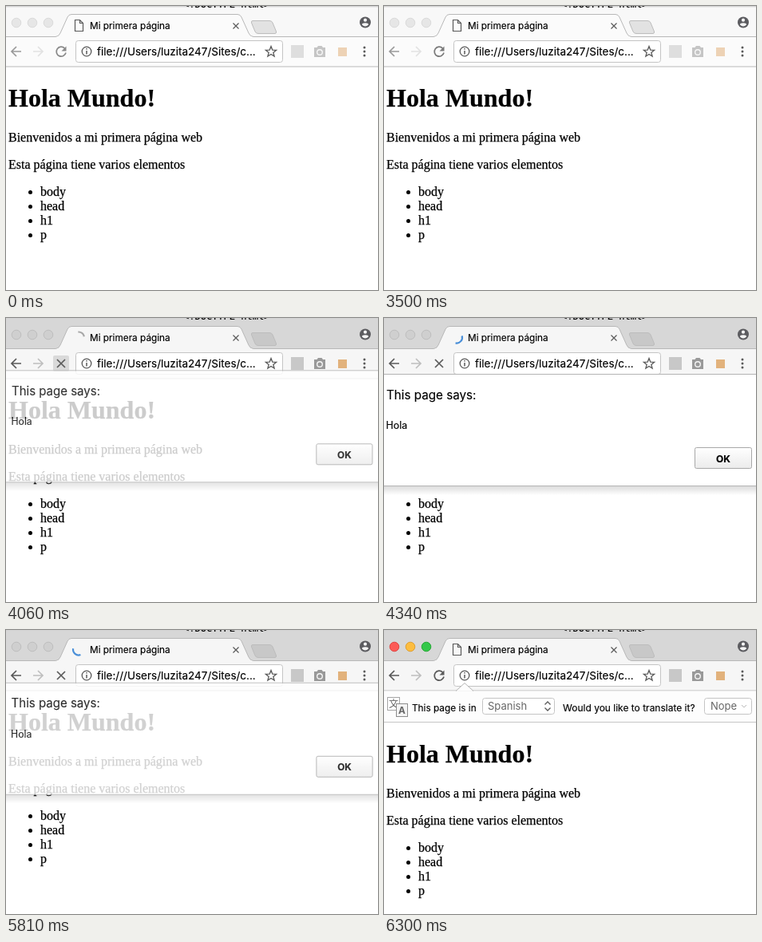
Write an HTML page that moves like this. It is 466 px wide and 356 px high and loops after 8 s.

```html
<!DOCTYPE html>
<html lang="es">
<head>
<meta charset="utf-8">
<style>
  html, body { margin: 0; width: 100%; height: 100%; overflow: hidden; background: #fff; }
  svg { display: block; width: 466px; height: 356px; }
  text { font-family: Inter, sans-serif; font-size: 11.8px; white-space: pre; stroke: #000; stroke-width: .15px; }
  #page text { font-family: "Liberation Serif", serif; font-size: 16px; stroke-width: .25px; }
  #page .h1 { font-size: 32px; font-weight: bold; }
  .soft { fill: #666; stroke: none; }
  .line { fill: none; stroke: #5a5a5a; stroke-width: 1.7; }
  .box { fill: #fff; stroke: #c4c4c4; }
</style>
</head>
<body>
<svg viewBox="0 0 466 356">
  <defs>
    <linearGradient id="shade" x2="0" y2="1">
      <stop stop-opacity=".15"/><stop offset="1" stop-opacity="0"/>
    </linearGradient>
    <linearGradient id="key" x2="0" y2="1">
      <stop stop-color="#fff"/><stop offset="1" stop-color="#ebebeb"/>
    </linearGradient>
    <clipPath id="top"><rect width="466" height="2"/></clipPath>
    <clipPath id="below"><rect y="76.5" width="466" height="280"/></clipPath>
  </defs>
  <rect width="466" height="356" fill="#fff"/>

  <g id="page">
    <text class="h1" x="3" y="126">Hola Mundo!</text>
    <text x="3" y="170">Bienvenidos a mi primera página web</text>
    <text x="3" y="204">Esta página tiene varios elementos</text>
    <g id="list"></g>
  </g>

  <!-- tab strip -->
  <rect id="strip" width="466" height="39"/>
  <rect width="466" height="1.4" fill="#d4d4d4"/>
  <g clip-path="url(#top)"><text x="222" y="1.5" style="font:12px 'DejaVu Sans Mono',monospace">&lt;!DOCTYPE html&gt;</text></g>
  <g id="lights"><circle cx="13" cy="21" r="5.8"/><circle cx="33" cy="21" r="5.8"/><circle cx="53" cy="21" r="5.8"/></g>
  <path id="plus" d="M309 18.5H330Q333 18.5 334 21L338.5 32Q339 34.5 337 34.5H316Q313 34.5 312 32L307.5 21Q307 18.5 309 18.5Z" stroke="#bcbcbc"/>
  <g id="bars">
    <rect y="38" width="466" height="38"/>
    <path d="M0 38.5H62Q66 38.5 68 34L77 14Q78.5 10.5 82 10.5H290Q293.5 10.5 295 14L304 34Q306 38.5 310 38.5H466" stroke="#b8b8b8"/>
    <rect x="64" y="38" width="244" height="2"/>
  </g>
  <path d="M0 76H466" stroke="#b8b8b8"/>
  <path id="doc" class="line" style="stroke-width:1.2" d="M86.5 17.5H92.5L96.5 21.5V31.5H86.5ZM92.5 17.5V21.5H96.5"/>
  <path id="spin" fill="none" stroke-width="2.2"/>
  <text x="105" y="29">Mi primera página</text>
  <path class="line" style="stroke-width:1.2" d="M284.5 21.5l7 7m0-7l-7 7"/>
  <circle cx="450" cy="20.5" r="7" fill="#5c5c60"/>
  <circle cx="450" cy="17.7" r="2.1" fill="#f4f4f4"/>
  <path d="M445.8 23.3Q446 21.2 450 21.2Q454 21.2 454.2 23.3Q450 27.7 445.8 23.3Z" fill="#f4f4f4"/>

  <!-- toolbar -->
  <rect id="hover" x="59" y="47" width="20" height="20" rx="2" fill="#d9d9d9"/>
  <path id="back" class="line" d="M19 57H7M13 51L7 57L13 63"/>
  <path id="forward" class="line" d="M34 57H46M40 51L46 57L40 63"/>
  <g id="reload"><path class="line" d="M73.5 53A6 6 0 1 0 75 58.5"/><path d="M75.5 50.5V56.5H69.5Z" fill="#5a5a5a"/></g>
  <path id="stop" class="line" d="M64 52l10 10m0-10l-10 10"/>
  <rect class="box" x="87.5" y="43.5" width="259" height="27" rx="3"/>
  <circle class="line" style="stroke-width:1.3" cx="101" cy="57" r="5.8"/>
  <path class="line" style="stroke-width:1.5" d="M101 56V60.5M101 53V54.6"/>
  <text x="114" y="62" style="font-size:13.5px">file:///Users/luzita247/Sites/c...</text>
  <path id="star" class="line" style="stroke-width:1.3"/>
  <g id="tools">
    <rect x="357" y="49" width="16" height="16" fill="#c8c8c8"/>
    <path d="M386 52H389.5L391 50H395.5L397 52H400V64H386Z" fill="#999"/>
    <circle cx="393" cy="58" r="3.3" fill="#999" stroke="#f6f6f6" stroke-width="1.4"/>
    <rect x="416" y="52" width="11" height="11" fill="#e2b27c"/>
  </g>
  <g fill="#5a5a5a"><circle cx="449" cy="52" r="1.5"/><circle cx="449" cy="57" r="1.5"/><circle cx="449" cy="62" r="1.5"/></g>

  <!-- translate bar -->
  <g id="barWrap">
    <g clip-path="url(#below)"><g id="bar">
      <rect y="76" width="466" height="39" fill="#fdfdfd"/>
      <path d="M0 115.5H466" stroke="#c6c6c6"/>
      <rect x="4.5" y="84.5" width="15" height="16" fill="#fff" stroke="#a5a5a5"/>
      <text class="soft" x="6" y="97" style="font:12px 'Noto Sans CJK JP','Noto Sans CJK SC',sans-serif">文</text>
      <rect x="15.5" y="92.5" width="14" height="16" fill="#f4f4f4" stroke="#8c8c8c"/>
      <text class="soft" x="18" y="105" style="font-weight:bold">A</text>
      <text x="35" y="102">This page is in</text>
      <rect class="box" x="123.5" y="85.5" width="90" height="20" rx="3"/>
      <text class="soft" x="130" y="100" style="font-size:13px">Spanish</text>
      <path class="line" style="stroke-width:1.3" d="M201.5 93.5l3.5-3.5l3.5 3.5m-7 4l3.5 3.5l3.5-3.5"/>
      <text x="224" y="102" style="font-size:12px">Would you like to translate it?</text>
      <rect class="box" x="401.5" y="85.5" width="59" height="20" rx="3"/>
      <text class="soft" x="409" y="100" style="font-size:13px">Nope</text>
      <path d="M448 94l3 3l3-3" fill="none" stroke="#bbb"/>
    </g></g>
    <path d="M90 76.5L101 66.5L112 76.5" fill="#fdfdfd" stroke="#b4b4b4"/>
  </g>

  <g id="alert">
    <rect x="-20" y="210" width="520" height="12" fill="url(#shade)"/>
    <rect x="-20" y="71" width="520" height="139.5" fill="#fff"/>
    <path d="M-20 70.5H500M-20 210.5H500" stroke="#b4b4b4"/>
    <text x="3" y="101.5" style="font-size:15.2px">This page says:</text>
    <text x="2.5" y="139" style="font-size:12.4px">Hola</text>
    <rect x="389.5" y="162.5" width="71" height="26" rx="2" fill="url(#key)" stroke="#a8a8a8"/>
    <text x="425" y="180.5" text-anchor="middle" style="font-size:12px;font-weight:bold">OK</text>
  </g>
</svg>
<script>
const $ = id => document.getElementById(id);
const set = (el, attrs) => { for (const k in attrs) el.setAttribute(k, attrs[k]); };
const show = (id, on) => set($(id), { opacity: +on });
const clamp = v => Math.max(0, Math.min(1, v));

// Linear interpolation through [time, value] points
function track(t, points) {
  let [t0, v0] = points[0];
  for (const [t1, v1] of points) {
    if (t < t1) return t <= t0 ? v0 : v0 + (v1 - v0) * (t - t0) / (t1 - t0);
    [t0, v0] = [t1, v1];
  }
  return v0;
}

$('list').innerHTML = ['body', 'head', 'h1', 'p'].map((s, i) =>
  `<circle cx="30.5" cy="${233.5 + 18 * i}" r="2.5"/><text x="43" y="${238 + 18 * i}">${s}</text>`).join('');

const polar = (x, y, r, deg) => {
  const a = deg * Math.PI / 180;
  return [x + r * Math.cos(a), y + r * Math.sin(a)].map(v => v.toFixed(2)).join(' ');
};
set($('star'), { d: 'M' + Array.from({ length: 10 }, (_, i) =>
  polar(332, 57.5, i % 2 ? 3 : 7, 36 * i - 90)).join('L') + 'Z' });

const lights = [...$('lights').children];
const bright = [['#fc5b57', '#df4643'], ['#fdbd3f', '#dd9f33'], ['#34c84a', '#27a836']];

function spinner(t) {
  const waiting = t < 4200;
  const from = waiting ? -95 - 0.27 * (t - 4060) : -165 + 0.305 * (t - 5040);
  const sweep = waiting ? 85 : 120;
  set($('spin'), {
    d: `M${polar(91, 24.5, 7, from)}A7 7 0 0 1 ${polar(91, 24.5, 7, from + sweep)}`,
    stroke: waiting ? '#a8a8a8' : '#4a8fd8'
  });
}

function draw(t) {
  const active = t >= 3920;
  const loading = active && t < 5950;
  const sheet = t >= 3990 && t < 5950;

  set($('strip'), { fill: active ? '#d7d7d7' : '#f8f8f8' });
  set($('bars'), { fill: active ? '#f6f6f6' : '#fbfbfb' });
  set($('plus'), { fill: active ? '#c8c8c8' : '#e2e2e2' });
  lights.forEach((el, i) => {
    const [fill, stroke] = !active ? ['#e6e6e6', '#dadada'] : sheet ? ['#cfcfcf', '#bebebe'] : bright[i];
    set(el, { fill, stroke });
  });
  set($('back'), { opacity: active ? 1 : 0.6 });
  set($('forward'), { opacity: active ? 0.35 : 0.15 });
  set($('tools'), { opacity: active ? 1 : 0.55 });

  show('doc', !loading);
  show('spin', loading);
  show('stop', loading);
  spinner(t);
  set($('reload'), { opacity: loading ? 0 : active ? 1 : 0.7 + 0.3 * clamp((t - 3430) / 210) });
  show('hover', active && t < 4200);

  const a = track(t, [[3920, 0], [3990, 0.4], [4060, 0.8], [4130, 0.95], [4200, 1],
    [5670, 1], [5740, 0.95], [5810, 0.82], [5880, 0.4], [5950, 0]]);
  const k = 5 * (1 - a);
  set($('alert'), { opacity: a, transform: `translate(${4 * k} ${-4.7 * k}) scale(${1 - 0.012 * k} 1)` });

  const drop = t >= 6300 ? 40 : track(t, [[5950, 0], [6090, 23]]);
  set($('page'), { transform: `translate(0 ${drop})` });
  set($('bar'), { transform: `translate(0 ${drop - 40})` });
  show('barWrap', drop > 0);
}

const begin = performance.now();
function tick(now) {
  const t = Math.max(0, now - begin) % 8000;
  draw(Math.floor(t / 70) * 70);
  requestAnimationFrame(tick);
}
draw(0);
requestAnimationFrame(tick);
</script>
</body>
</html>
```
